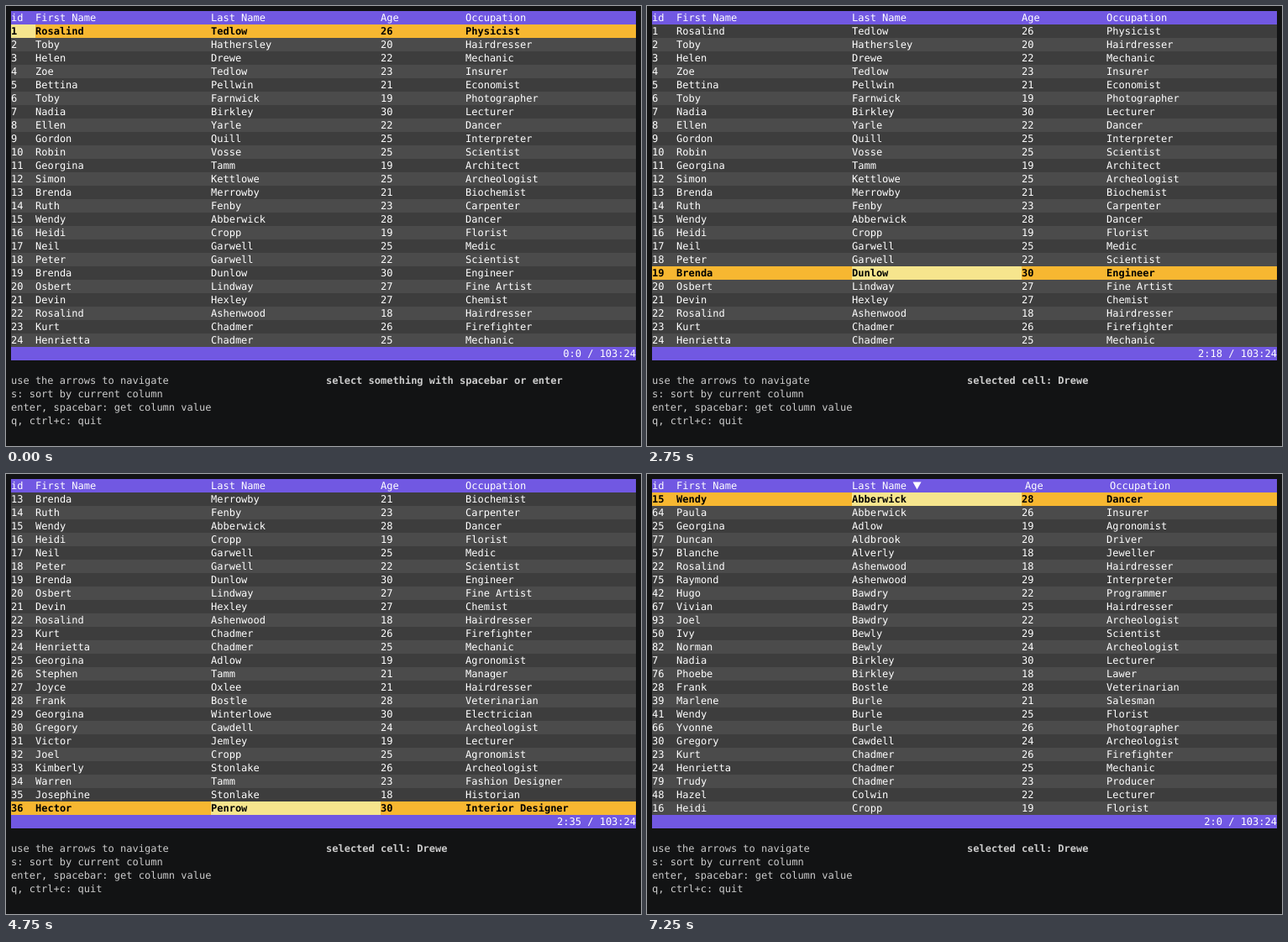
Recreate the animation shown at these times as an HTML page. Size 756 px wide and 524 px high, loop 8000 ms.

```html
<!DOCTYPE html>
<html lang="en">
<head>
<meta charset="utf-8">
<title>Terminal table</title>
<style>
html, body { margin: 0; width: 100%; height: 100%; overflow: hidden; background: #121314; }
body {
  position: relative; color: #ccc; white-space: pre;
  font: 12px/16px "DejaVu Sans Mono", "Liberation Mono", monospace;
  text-rendering: geometricPrecision; font-variant-ligatures: none;
}
.row { position: absolute; left: 6px; width: 744px; height: 16px; color: #fff; background: #3d3d3d; }
.row.odd { background: #4b4b4b; }
.row.bar { background: #7158e2; }
.row.on { background: #f7b731; color: #000; font-weight: bold; }
.row span { position: absolute; top: 0; height: 16px; }
.row span.cur { background: #f6e58d; }
.c0 { left: 0; width: 29px; }
.c1 { left: 29px; width: 209px; }
.c2 { left: 238px; width: 202px; }
.c3 { left: 440px; width: 101px; }
.c4 { left: 541px; width: 203px; }
.sorted .c3, .sorted .c4 { margin-left: 4px; }
#arrow { position: absolute; left: 310px; top: 3px; visibility: hidden; }
.sorted #arrow { visibility: visible; }
#foot { top: 406px; text-align: right; }
#help, #picked { position: absolute; top: 438px; }
#help { left: 6px; }
#picked { left: 381px; font-weight: bold; }
</style>
</head>
<body>
<div class="row bar" id="head" style="top:6px"><svg id="arrow" width="11" height="10"><path d="M.5 .5H10.5L5.5 9.5Z" fill="#fff"/></svg></div>
<div class="row bar" id="foot"></div>
<div id="help">use the arrows to navigate
s: sort by current column
enter, spacebar: get column value
q, ctrl+c: quit</div>
<div id="picked"></div>
<script>
const people = `1 Rosalind Tedlow 26 Physicist
2 Toby Hathersley 20 Hairdresser
3 Helen Drewe 22 Mechanic
4 Zoe Tedlow 23 Insurer
5 Bettina Pellwin 21 Economist
6 Toby Farnwick 19 Photographer
7 Nadia Birkley 30 Lecturer
8 Ellen Yarle 22 Dancer
9 Gordon Quill 25 Interpreter
10 Robin Vosse 25 Scientist
11 Georgina Tamm 19 Architect
12 Simon Kettlowe 25 Archeologist
13 Brenda Merrowby 21 Biochemist
14 Ruth Fenby 23 Carpenter
15 Wendy Abberwick 28 Dancer
16 Heidi Cropp 19 Florist
17 Neil Garwell 25 Medic
18 Peter Garwell 22 Scientist
19 Brenda Dunlow 30 Engineer
20 Osbert Lindway 27 Fine Artist
21 Devin Hexley 27 Chemist
22 Rosalind Ashenwood 18 Hairdresser
23 Kurt Chadmer 26 Firefighter
24 Henrietta Chadmer 25 Mechanic
25 Georgina Adlow 19 Agronomist
26 Stephen Tamm 21 Manager
27 Joyce Oxlee 21 Hairdresser
28 Frank Bostle 28 Veterinarian
29 Georgina Winterlowe 30 Electrician
30 Gregory Cawdell 24 Archeologist
31 Victor Jemley 19 Lecturer
32 Joel Cropp 25 Agronomist
33 Kimberly Stonlake 26 Archeologist
34 Warren Tamm 23 Fashion Designer
35 Josephine Stonlake 18 Historian
36 Hector Penrow 30 Interior Designer
39 Marlene Burle 21 Salesman
41 Wendy Burle 25 Florist
42 Hugo Bawdry 22 Programmer
48 Hazel Colwin 22 Lecturer
50 Ivy Bewly 29 Scientist
57 Blanche Alverly 18 Jeweller
64 Paula Abberwick 26 Insurer
66 Yvonne Burle 26 Photographer
67 Vivian Bawdry 25 Hairdresser
75 Raymond Ashenwood 29 Interpreter
76 Phoebe Birkley 18 Lawer
77 Duncan Aldbrook 20 Driver
79 Trudy Chadmer 23 Producer
82 Norman Bewly 24 Archeologist
93 Joel Bawdry 22 Archeologist`
  .split("\n").map(line => line.match(/(\d+) (\S+) (\S+) (\d+) (.+)/).slice(1));
const byLast = [...people].sort((a, b) => a[2] < b[2] ? -1 : a[2] > b[2] ? 1 : a[0] - b[0]);

const STEP = 250, LOOP = 8000, VISIBLE = 24, SORT_STEP = 29;
// Cursor row after each key step
const path = [0, 1, 2, 2, 2, 2, 2, 2, 2, 3, 9, 18, 20, 22, 24, 26, 28, 30, 32, 35,
  33, 30, 27, 21, 15, 9, 6, 3, 0, 0];
let top0 = 0;
const tops = path.map(row => top0 = Math.max(Math.min(top0, row), row - VISIBLE + 1));

const $ = id => document.getElementById(id);

function addCells(row, texts) {
  return texts.map((text, i) => {
    const cell = document.createElement("span");
    cell.className = "c" + i;
    cell.textContent = text;
    return row.appendChild(cell);
  });
}

addCells($("head"), ["id", "First Name", "Last Name", "Age", "Occupation"]);
const lines = Array.from({ length: VISIBLE }, (_, i) => {
  const el = document.createElement("div");
  el.style.top = 22 + 16 * i + "px";
  document.body.appendChild(el);
  return { el, cells: addCells(el, ["", "", "", "", ""]) };
});

function pickedText(step) {
  if (step < 5) return "select something with spacebar or enter";
  return "selected cell: " + people[2][step < 8 ? 1 : 2];
}

function draw(step) {
  const row = path[step], top = tops[step];
  const col = step < 3 ? 0 : step < 6 ? 1 : 2;
  const sorted = step >= SORT_STEP;
  const data = sorted ? byLast : people;
  lines.forEach(({ el, cells }, i) => {
    const n = top + i, on = n === row;
    el.className = "row" + (n % 2 ? " odd" : "") + (on ? " on" : "");
    cells.forEach((cell, c) => {
      cell.textContent = data[n][c];
      cell.classList.toggle("cur", on && c === col);
    });
  });
  $("head").classList.toggle("sorted", sorted);
  $("foot").textContent = `${col}:${row} / 103:24`;
  $("picked").textContent = pickedText(step);
}

let shown = 0;
const start = performance.now();
function tick() {
  const t = (performance.now() - start) % LOOP;
  const step = Math.min(Math.floor(t / STEP), path.length - 1);
  if (step !== shown) draw(shown = step);
  requestAnimationFrame(tick);
}
draw(0);
requestAnimationFrame(tick);
</script>
</body>
</html>
```
